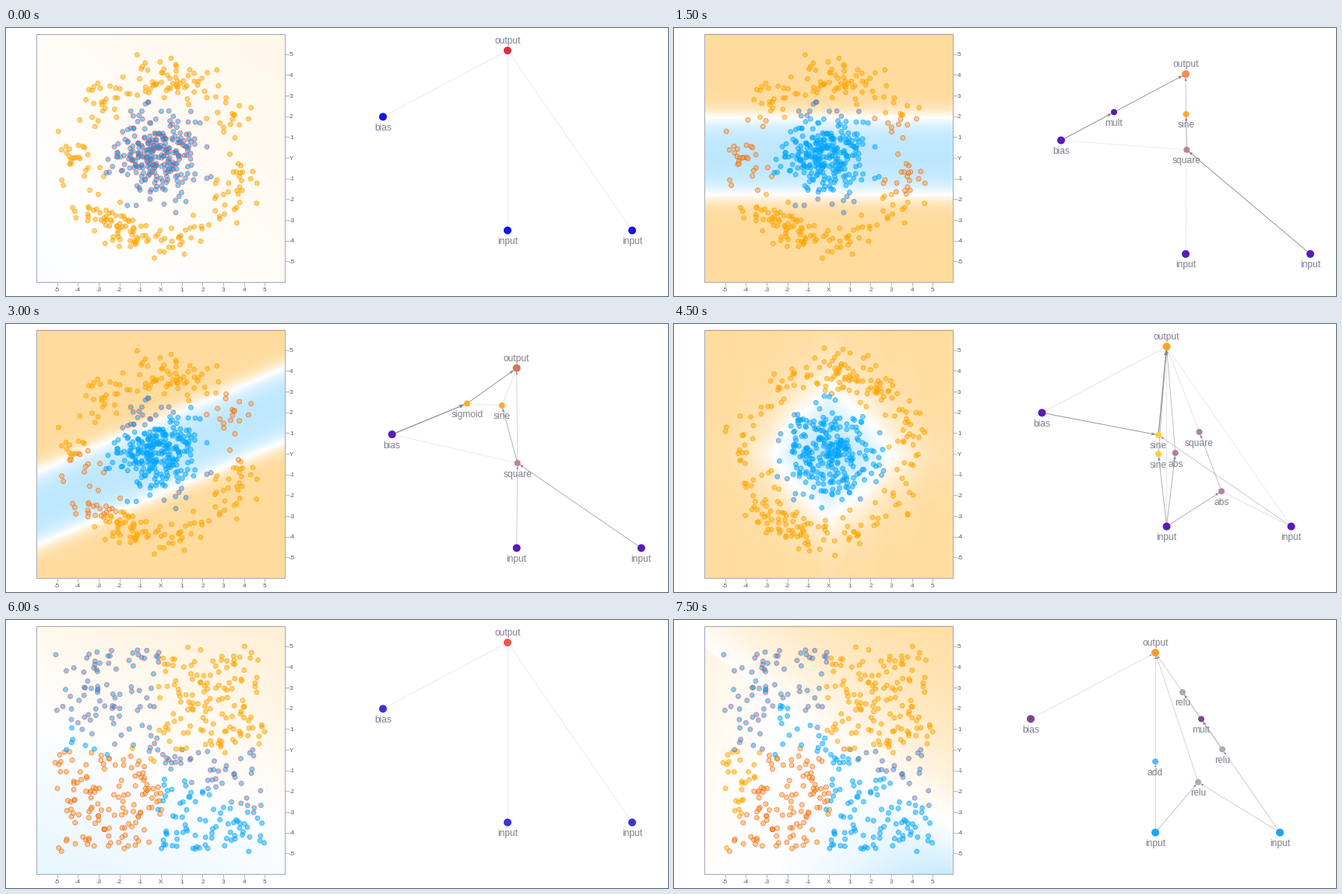
A matplotlib script for the animation above (8000 ms loop, 850 px wide and 345 px high).

```python
import numpy as np
import matplotlib.pyplot as plt
from matplotlib.animation import FuncAnimation
from matplotlib.patches import Circle, Polygon, Rectangle

W, H, DPI = 850, 345, 64
PX = 72 / DPI                      # points per pixel
L, T, R, B = 39, 7, 359, 327       # plot box
CX, CY, UNIT = (L + R) / 2, (T + B) / 2, (R - L) / 12

plt.rcParams["font.family"] = "Liberation Sans"
fig = plt.figure(figsize=(W / DPI, H / DPI), dpi=DPI, facecolor="white")
ax = fig.add_axes([0, 0, 1, 1])
ax.axis("off")


def rgb(*c):
    return tuple(v / 255 for v in c)


ORANGE, BLUE = rgb(255, 165, 0), rgb(0, 165, 255)
WARM, COOL = np.array(rgb(255, 220, 158)), np.array(rgb(182, 229, 255))
RED, SLATE = rgb(235, 60, 60), rgb(75, 115, 165)
INK, LABEL, RULE = rgb(131, 127, 143), rgb(85, 88, 104), rgb(168, 168, 181)
PURPLE, YELLOW, MAUVE = rgb(88, 27, 186), rgb(255, 209, 45), rgb(178, 128, 165)
AMBER, PINK, GREY = rgb(255, 172, 45), rgb(190, 130, 155), rgb(180, 168, 174)
INDIGO, SKY, PLUM = rgb(58, 52, 214), rgb(28, 166, 250), rgb(125, 70, 148)


# ---- decision fields: positive is warm, negative is cool ----
def tilt_faint(x, y):
    return 0.012 * (x + y + 7.3)


def flat_band(x, y):
    return np.tanh(0.42 * ((y - 0.08) ** 2 - 3.4))


def slant_band(x, y):
    u = y + 0.13 - 0.42 * x
    return np.tanh(0.45 * (u ** 2 - 3.1))


def diamond(x, y):
    ex = np.abs(x) / np.where(x < 0, 2.6, 3.0)
    ey = np.abs(y) / np.where(y < 0, 2.95, 3.05)
    r = (ex ** 1.2 + ey ** 1.2) ** (1 / 1.2)
    return np.tanh(1.6 * (r - 1)) - 0.02 * (1 + np.cos(3.3 * x))


def tilt(x, y):
    return 0.045 * (y + 0.47 * x + 0.95)


def wedge(x, y):
    d = y + 0.72 * x - 0.6
    side = x + 3.1 - 0.35 * y
    cool = 0.00023 * np.maximum(side, 0) ** 3 * d
    cream = 0.06 * np.maximum(-side, 0)
    return np.where(d > 0, np.tanh(0.16 * d), cool + cream)


def shade(field):
    xs = (np.arange(L, R) + 0.5 - CX) / UNIT
    ys = (CY - np.arange(T, B) - 0.5) / UNIT
    v = np.clip(field(*np.meshgrid(xs, ys)), -1, 1)[..., None]
    return 1 - np.where(v > 0, v * (1 - WARM), -v * (1 - COOL))


# ---- point clouds ----
def rings(seed, spread):
    rng = np.random.default_rng(seed)
    a = rng.uniform(0, 2 * np.pi, 175)
    a = np.append(a, rng.normal(1.35, 0.28, 38))
    a = np.append(a, rng.normal(-2.1, 0.28, 42))
    r = np.clip(rng.normal(4.0, 0.5, a.size), 2.9, 5.1)
    blob = rng.normal(0, spread, (275, 2)) + [-0.1, 0.1]
    blob = blob[np.hypot(*blob.T) < 2.85]
    x = np.append(r * np.cos(a), blob[:, 0])
    y = np.append(r * np.sin(a), blob[:, 1])
    return x, y, np.arange(x.size) < a.size


def quadrants(seed):
    rng = np.random.default_rng(seed)
    x, y = rng.uniform(-4.9, 4.9, (2, 500))
    warm = x * y > 0
    return (x + rng.normal(0, 0.17, x.size),
            y + rng.normal(0, 0.17, x.size), warm)


def cloud(data, field, wrong):
    x, y, warm = data
    miss = (field(x, y) > 0) != warm
    face = [(ORANGE if w else BLUE) + (0.5,) for w in warm]
    edge = [wrong + (0.6,) if m else (ORANGE if w else BLUE) + (0.7,)
            for w, m in zip(warm, miss)]
    return ax.scatter(CX + UNIT * x, CY - UNIT * y, s=(6 * PX) ** 2,
                      c=face, edgecolors=edge, linewidths=0.8 * PX, zorder=3)


# ---- network graph ----
def node(x, y, name, color, r=5):
    side = -13.5 if name == "output" else 13
    return [ax.add_patch(Circle((x, y), r, fc=color, ec="none", zorder=6)),
            ax.text(x, y + side, name, color=INK, fontsize=12 * PX,
                    ha="center", va="center_baseline", zorder=7)]


def link(p, q, weight, stop=5):
    """Weight 0 is a faint line; above that it darkens and gains an arrowhead."""
    p, q = np.array(p, float), np.array(q, float)
    d = (q - p) / np.hypot(*(q - p))
    n = np.array([-d[1], d[0]])
    g = 0.91 - 0.35 * min(weight, 1)
    color = (g, g * 0.985, min(1, g * 1.015))
    width = 0.8 + 0.5 * max(weight - 0.6, 0)
    out = ax.plot(*zip(p, q), color=color, lw=width * PX, zorder=4)
    if weight > 0.12:
        tip, size = q - d * stop, 2.5 + 2.5 * weight
        back = tip - d * size
        head = Polygon([tip, back + n * size * 0.42, back - n * size * 0.42],
                       fc=rgb(140, 136, 152), ec="none", zorder=5)
        out.append(ax.add_patch(head))
    return out


def graph(ox, oy, top, base, foot, hidden, links):
    """Output, bias and inputs keep fixed offsets; hidden nodes vary."""
    spots = {
        "out": (ox, oy, "output", top),
        "bias": (ox - 160, oy + 85.3, "bias", base),
        "in1": (ox, oy + 231.6, "input", foot),
        "in2": (ox + 160, oy + 231.6, "input", foot),
    }
    spots.update({k: v + (4,) for k, v in hidden.items()})
    parts = []
    for a, b, weight in links:
        stop = 5 if b == "out" else 4
        parts += link(spots[a][:2], spots[b][:2], weight, stop)
    for spot in spots.values():
        parts += node(*spot)
    return parts


def scene(field, data, net, wrong=RED):
    image = ax.imshow(shade(field), extent=(L, R, B, T), aspect="auto",
                      interpolation="nearest", zorder=1)
    return [image, cloud(data, field, wrong)] + graph(*net)


# ---- frame, ticks and labels ----
ax.add_patch(Rectangle((L + 0.5, T + 0.5), R - L - 1, B - T - 1, fc="none",
                       ec=RULE, lw=PX, zorder=2))
text = dict(color=LABEL, fontsize=8 * PX, va="center_baseline")
for i in range(-5, 6):
    x, y = CX + UNIT * i, CY - UNIT * i
    ax.plot([x, x], [B, B + 4.5], color=RULE, lw=0.8 * PX)
    ax.plot([R, R + 4.5], [y, y], color=RULE, lw=0.8 * PX)
    ax.text(x, 336.5, str(i) if i else "X", ha="center", **text)
    ax.text(R + 5, y, str(i) if i else "Y", ha="left", **text)

plain = [("bias", "out", 0), ("in1", "out", 0), ("in2", "out", 0)]
first, second, cross = rings(4, 1.0), rings(11, 1.1), quadrants(7)
NAVY = rgb(20, 20, 232)

scenes = [
    scene(tilt_faint, first,
          (644, 29, rgb(215, 50, 60), NAVY, NAVY, {}, plain)),
    scene(flat_band, first,
          (657, 59.3, rgb(250, 138, 88), PURPLE, PURPLE,
           {"mult": (565, 108.3, "mult", PURPLE),
            "sine": (657.5, 111, "sine", AMBER),
            "sq": (658.3, 156.8, "square", PINK)},
           [("bias", "sq", 0), ("in1", "sq", 0.05), ("in2", "sq", 0.9),
            ("sq", "sine", 0.8), ("sine", "out", 0.5),
            ("bias", "mult", 1), ("mult", "out", 0.9)])),
    scene(slant_band, first,
          (655.7, 56.8, rgb(215, 118, 92), PURPLE, PURPLE,
           {"sig": (592, 102.4, "sigmoid", AMBER),
            "sine": (636.8, 104.9, "sine", AMBER),
            "sq": (656.7, 179, "square", PINK)},
           [("bias", "sq", 0), ("sig", "sine", 0.05), ("sine", "out", 0.05),
            ("sq", "out", 0.3), ("in1", "sq", 0.4), ("in2", "sq", 0.7),
            ("sq", "sine", 0.7), ("sig", "out", 0.9), ("bias", "sig", 1.5)])),
    scene(diamond, second,
          (632.5, 29, rgb(255, 166, 32), PURPLE, PURPLE,
           {"s1": (622, 143, "sine", YELLOW),
            "s2": (622, 167.3, "sine", YELLOW),
            "a1": (643.7, 166, "abs", MAUVE),
            "sq": (674.5, 139, "square", MAUVE),
            "a2": (703, 215.3, "abs", MAUVE)},
           [("bias", "out", 0.1), ("in1", "out", 0.1), ("in2", "out", 0),
            ("sq", "out", 0.05), ("in2", "a2", 0.1), ("in2", "s1", 0.4),
            ("a2", "sq", 0.6), ("in1", "a2", 0.7), ("in1", "a1", 0.7),
            ("in1", "s2", 0.7), ("a1", "out", 0.6), ("s2", "out", 0.6),
            ("bias", "s1", 0.9), ("s1", "out", 1.5)]), SLATE),
    scene(tilt, cross,
          (644, 29, rgb(230, 90, 76), INDIGO, INDIGO, {}, plain)),
    scene(wedge, cross,
          (618, 42, rgb(255, 157, 52), PLUM, SKY,
           {"r1": (653, 93, "relu", GREY),
            "mul": (677, 127.5, "mult", PLUM),
            "r2": (704, 166.5, "relu", GREY),
            "add": (618, 182.3, "add", rgb(92, 182, 246)),
            "r3": (673, 208.7, "relu", GREY)},
           [("bias", "out", 0.13), ("in1", "add", 0.2), ("add", "out", 0.2),
            ("r3", "out", 0.3), ("in1", "r3", 0.5), ("in2", "r3", 0.35),
            ("in2", "r2", 0.4), ("r2", "mul", 0.8), ("mul", "r1", 0.7),
            ("r1", "out", 0.35)])),
]
ax.set(xlim=(0, W), ylim=(H, 0))


def update(i):
    for k, parts in enumerate(scenes):
        for part in parts:
            part.set_visible(k == i // 3)
    return []


anim = FuncAnimation(fig, update, init_func=lambda: update(0), frames=16,
                     interval=500, repeat=True, repeat_delay=0)
plt.show()
```
